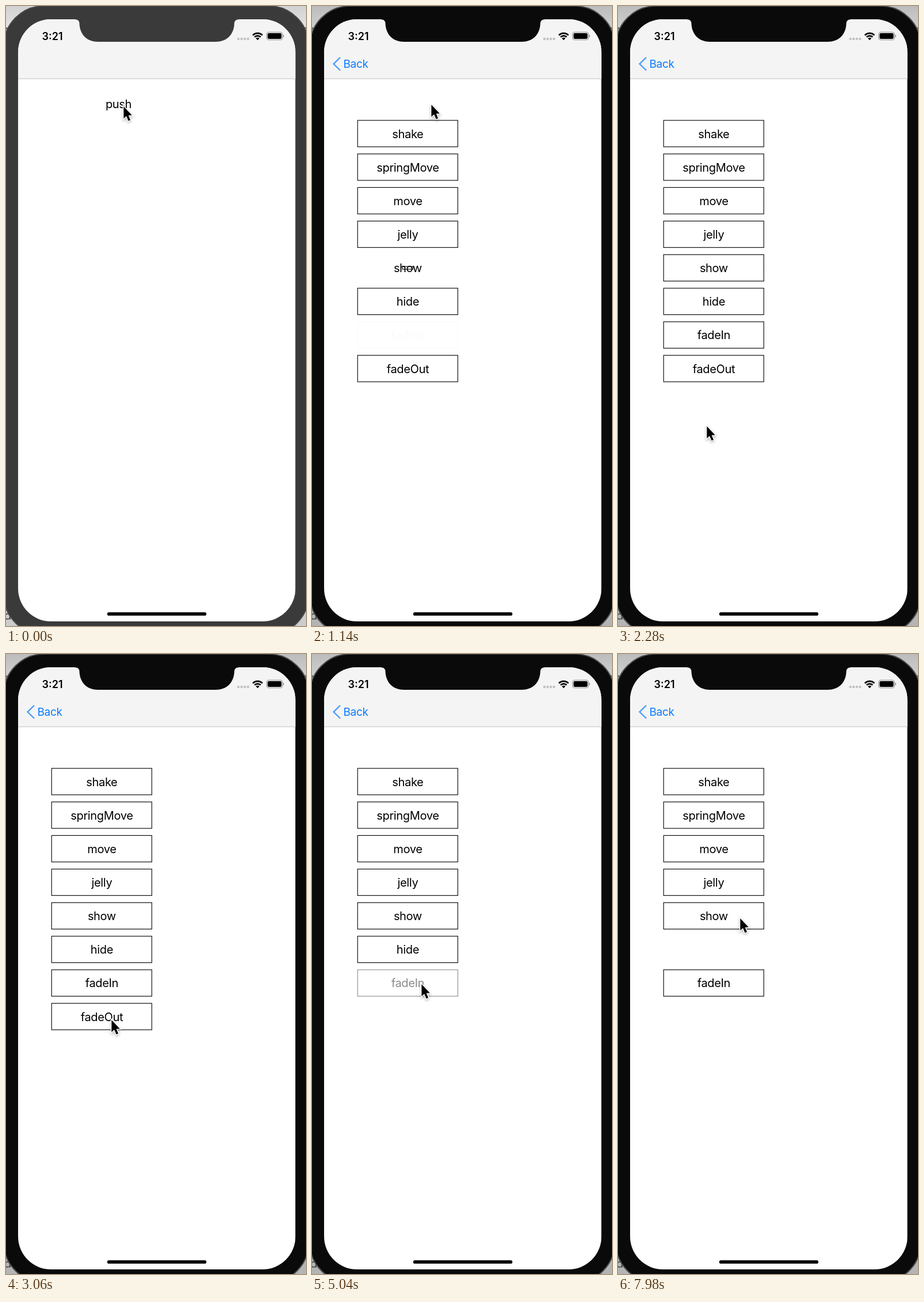
An HTML page with a canvas that plays this animation: 521 px wide and 1074 px high, repeating every 8000 ms.

```html
<!DOCTYPE html>
<html lang="en">
<head>
<meta charset="utf-8">
<title>Button effects</title>
<style>
html, body { margin: 0; width: 100%; height: 100%; overflow: hidden; background: #d4d4d4; }
canvas { display: block; width: 521px; height: 1074px; }
</style>
</head>
<body>
<canvas id="stage" width="521" height="1074"></canvas>
<script>
const ctx = document.getElementById('stage').getContext('2d');
const LOOP = 8000, STEP = 60;
const FONT = 'Inter, Roboto, sans-serif';
const SCREEN = { x: 21, y: 23, w: 481.7, h: 1043, r: 57 };
const BLUE = '#0a7bff', PALE_BLUE = '#4c9dfa';
const LABELS = ['shake', 'springMove', 'move', 'jelly', 'show', 'hide', 'fadeIn', 'fadeOut'];
const PUSH_START = 640, PUSH_END = 1100;

// time, tip x, tip y
const POINTER = [
  [0, 204, 173], [240, 207, 170], [1400, 207, 170], [2080, 150, 790],
  [2220, 152, 768], [2280, 154, 727], [2700, 183, 633], [4000, 183, 633],
  [4500, 190, 571], [5200, 190, 571], [5580, 196, 533], [5940, 198, 515],
  [7000, 198, 515], [7140, 199, 532], [7700, 212, 457], [LOOP, 212, 457]
];

const clamp = v => Math.max(0, Math.min(1, v));
const smooth = v => v * v * (3 - 2 * v);
const ramp = (t, start, length) => smooth(clamp((t - start) / length));

function pushProgress(t) {
  if (t >= PUSH_END) return 1;
  const x = 13.9 * Math.max(0, t - PUSH_START) / 1000;
  return 1 - (1 + x) * Math.exp(-x);
}

function pointerAt(t) {
  const i = POINTER.findIndex(k => k[0] > t);
  const [t0, x0, y0] = POINTER[i - 1], [t1, x1, y1] = POINTER[i];
  const k = ramp(t, t0, t1 - t0);
  return [x0 + (x1 - x0) * k, y0 + (y1 - y0) * k];
}

function roundRect(x, y, w, h, r) {
  ctx.beginPath();
  ctx.roundRect(x, y, w, h, r);
}

function line(points, width, color) {
  ctx.beginPath();
  points.forEach(([x, y]) => ctx.lineTo(x, y));
  ctx.lineWidth = width;
  ctx.strokeStyle = color;
  ctx.stroke();
}

function text(str, x, y, size = 20, align = 'center', color = '#000', weight = 400) {
  ctx.font = `${weight} ${size}px ${FONT}`;
  ctx.letterSpacing = weight === 400 ? '-0.35px' : '0px';
  ctx.textAlign = align;
  ctx.fillStyle = color;
  ctx.fillText(str, x, y);
}

function drawBody(active) {
  const bg = ctx.createLinearGradient(0, 0, 0, 1074);
  bg.addColorStop(0, active ? '#bcbcbc' : '#d2d2d2');
  bg.addColorStop(0.04, active ? '#d2d2d2' : '#e6e6e6');
  bg.addColorStop(1, active ? '#b4b4b4' : '#cccccc');
  ctx.fillStyle = bg;
  ctx.fillRect(0, 0, 521, 1074);
  line([[0, 37], [3, 42]], 2, '#555');
  line([[518, 38], [521, 38]], 2, '#555');
  text('d', -3, 1063, 20, 'left', '#444');
  roundRect(-4, 0, 530, 1089, 70);
  ctx.fillStyle = active ? '#0a0a0a' : '#3a3a3a';
  ctx.fill();
  ctx.lineWidth = 2;
  ctx.strokeStyle = active ? '#4c4c4c' : '#484848';
  ctx.stroke();
}

function drawButton(i, dx, scale, alpha) {
  if (scale <= 0 || alpha <= 0) return;
  const cx = 166.2 + dx, cy = 221 + i * 58.15;
  const w = 174 * scale, h = 45.8 * scale;
  ctx.globalAlpha = alpha;
  ctx.lineWidth = 1.2;
  ctx.strokeStyle = '#111';
  ctx.strokeRect(cx - w / 2, cy - h / 2, w, h);
  text(LABELS[i], cx + 0.2, cy + 7.5);
  ctx.globalAlpha = 1;
}

function drawPages(t, p) {
  const { x, y, w, h } = SCREEN;
  ctx.fillStyle = '#fff';
  ctx.fillRect(x, y, w, h);
  if (p < 1) {
    text('push', 195.5 - 144 * p, 176.5);
    ctx.fillStyle = `rgba(0,0,0,${0.13 * p})`;
    ctx.fillRect(x, y, w, h);
  }
  if (p <= 0) return;
  const scale = {
    show: ramp(t, PUSH_END - 10, 250),
    hide: 1 - ramp(t, 6370, 230)
  };
  const alpha = {
    fadeIn: t < 4760 ? ramp(t, PUSH_END - 10, 600) : ramp(t, 4760, 600),
    fadeOut: 1 - ramp(t, 3080, 600)
  };
  LABELS.forEach((name, i) =>
    drawButton(i, w * (1 - p), scale[name] ?? 1, alpha[name] ?? 1));
}

function drawNavBar(p) {
  ctx.fillStyle = '#f4f4f4';
  ctx.fillRect(SCREEN.x, SCREEN.y, SCREEN.w, 103);
  ctx.fillStyle = '#cbcbcb';
  ctx.fillRect(SCREEN.x, 125.4, SCREEN.w, 1.2);
  if (p <= 0) return;
  ctx.globalAlpha = clamp(p * 1.6);
  line([[49, 89], [37.5, 100.3], [49, 111.5]], 2.4, PALE_BLUE);
  ctx.globalAlpha = p;
  text('Back', 54.5 + 67 * (1 - p), 107, 19, 'left', BLUE);
  ctx.globalAlpha = 1;
}

function drawStatus() {
  text('3:21', 80.5, 58.8, 18, 'center', '#000', 600);
  for (let i = 0; i < 4; i++) {
    ctx.beginPath();
    ctx.arc(403.5 + i * 5.6, 57, 2.2, 0, 7);
    ctx.fillStyle = '#c2c2c2';
    ctx.fill();
  }
  const a0 = -Math.PI * 0.75, a1 = -Math.PI * 0.25;
  ctx.strokeStyle = ctx.fillStyle = '#000';
  ctx.lineWidth = 2.7;
  for (const r of [7.4, 11.8]) {
    ctx.beginPath();
    ctx.arc(437, 59, r, a0, a1);
    ctx.stroke();
  }
  ctx.beginPath();
  ctx.moveTo(437, 59.3);
  ctx.arc(437, 59, 4.3, a0, a1);
  ctx.fill();

  roundRect(452.6, 45.3, 27.6, 13.4, 3.8);
  ctx.lineWidth = 1.1;
  ctx.strokeStyle = '#8e8e8e';
  ctx.stroke();
  roundRect(454.3, 47, 24.2, 10, 2.2);
  ctx.fill();
  roundRect(481.3, 49.8, 1.6, 4.6, [0, 2, 2, 0]);
  ctx.fillStyle = '#999';
  ctx.fill();
}

function drawNotch(color) {
  ctx.beginPath();
  ctx.moveTo(120, 22);
  ctx.lineTo(120, 23.3);
  ctx.quadraticCurveTo(127.5, 23.3, 127.5, 31);
  ctx.bezierCurveTo(128.5, 50, 141, 62, 160, 62);
  ctx.lineTo(364, 62);
  ctx.bezierCurveTo(383, 62, 395.5, 50, 396.5, 31);
  ctx.quadraticCurveTo(396.5, 23.3, 404, 23.3);
  ctx.lineTo(404, 22);
  ctx.fillStyle = color;
  ctx.fill();
}

function drawPointer(x, y) {
  ctx.save();
  ctx.translate(x, y);
  ctx.beginPath();
  [[0.3, 1], [0.3, 22], [5, 17.8], [8.6, 26], [12, 24.5], [8.6, 16.6], [14.8, 16.2]]
    .forEach(([px, py]) => ctx.lineTo(px, py));
  ctx.closePath();
  ctx.lineWidth = 2.8;
  ctx.strokeStyle = '#fff';
  ctx.shadowColor = 'rgba(0,0,0,.3)';
  ctx.shadowBlur = 4;
  ctx.shadowOffsetY = 2;
  ctx.stroke();
  ctx.shadowColor = 'transparent';
  ctx.fillStyle = '#000';
  ctx.fill();
  ctx.restore();
}

function draw(t) {
  const active = t >= 600;
  const p = pushProgress(t);
  drawBody(active);
  ctx.save();
  roundRect(SCREEN.x, SCREEN.y, SCREEN.w, SCREEN.h, SCREEN.r);
  ctx.clip();
  drawPages(t, p);
  drawNavBar(p);
  drawStatus();
  roundRect(175.8, 1050.3, 172.2, 5.8, 2.9);
  ctx.fillStyle = '#000';
  ctx.fill();
  drawNotch(active ? '#0a0a0a' : '#3a3a3a');
  ctx.restore();
  drawPointer(...pointerAt(t));
}

const begin = performance.now();
function tick() {
  const t = (performance.now() - begin) % LOOP;
  draw(Math.floor(t / STEP) * STEP);
  requestAnimationFrame(tick);
}
tick();
</script>
</body>
</html>
```
